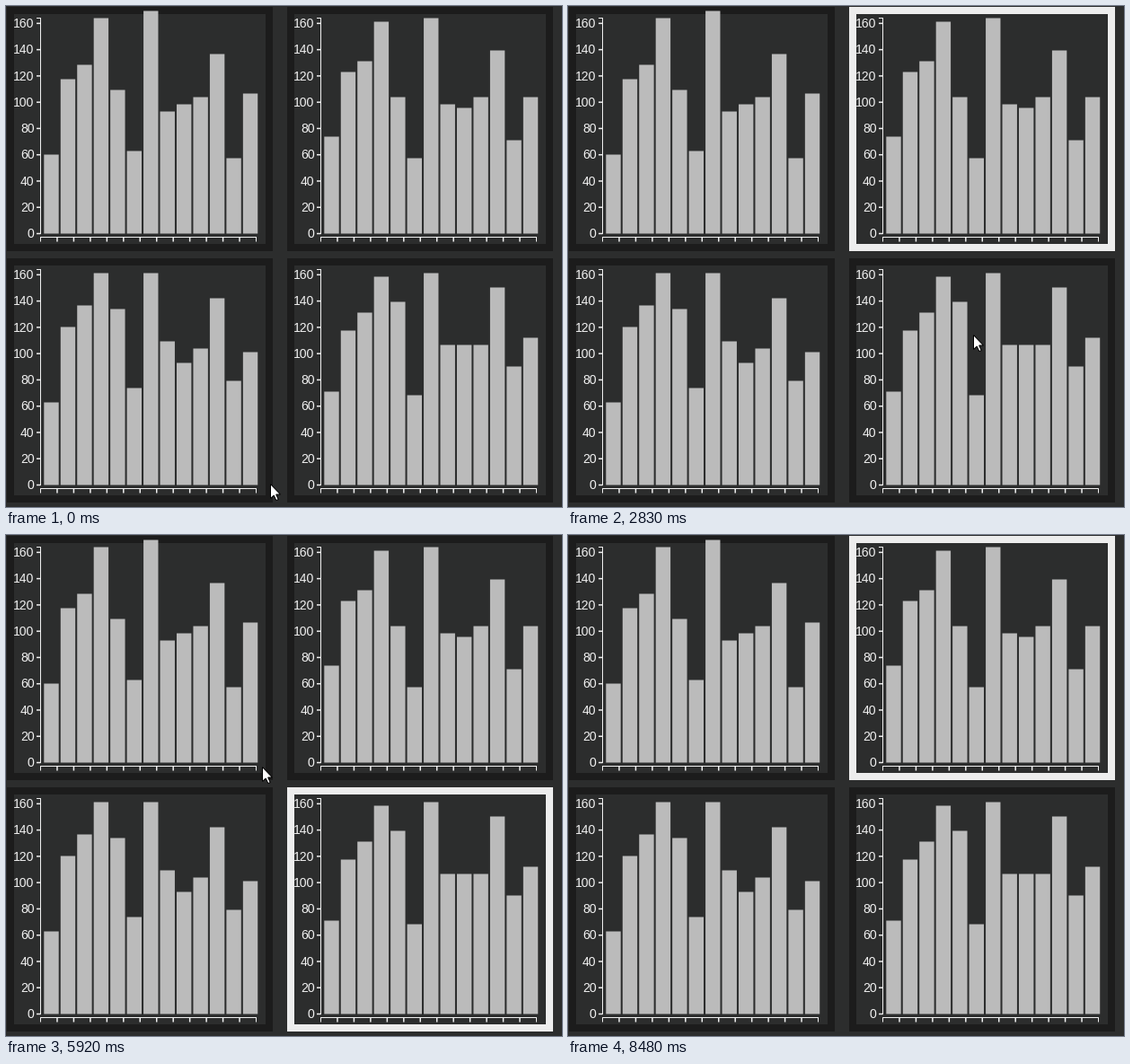
These frames come from a looping animation (619x558 px, 8.74 s). A matplotlib script:

```python
import matplotlib.pyplot as plt
import numpy as np
from matplotlib.animation import FuncAnimation
from matplotlib.collections import LineCollection, PolyCollection
from matplotlib.patches import Polygon, Rectangle

W, H, DPI = 619, 558, 64
LOOP, STEP = 8740, 20
PX = 72 / DPI  # points per pixel

BACK, BORDER, HOVER = "#2c2d2d", "#1c1c1c", "#ededed"
BAR, INK = "#bbbbbb", "#f0f0f0"

PANEL_DX, PANEL_DY = 312, 280
PLOT = 240       # side of the plot area
UNIT = 4         # pixels per count
SCALE = PLOT / 164

# Bar heights in counts, one row per panel
COUNTS = [
    [22, 43, 47, 60, 40, 23, 62, 34, 36, 38, 50, 21, 39],
    [27, 45, 48, 59, 38, 21, 60, 36, 35, 38, 51, 26, 38],
    [23, 44, 50, 59, 49, 27, 59, 40, 34, 38, 52, 29, 37],
    [26, 43, 48, 58, 51, 25, 59, 39, 39, 39, 55, 33, 41],
]
PITCH = PLOT / len(COUNTS[0])

# (start ms, pointer x, pointer y)
POINTER = np.array([
    (0, 294, 532), (440, 293, 528), (580, 291, 500), (700, 282, 400),
    (830, 268, 282), (980, 240, 230), (1130, 230, 228), (1260, 228, 227),
    (1410, 290, 226), (1530, 366, 225), (1680, 394, 225), (1800, 403, 225),
    (2410, 409, 245), (2530, 431, 319), (2680, 450, 363), (2830, 451, 366),
    (3290, 430, 367), (3430, 370, 331), (3550, 290, 283), (3680, 225, 240),
    (3800, 199, 217), (5220, 215, 223), (5350, 245, 238), (5470, 275, 250),
    (5620, 281, 254), (5770, 282, 256), (5920, 285, 258), (6660, 340, 310),
    (6780, 410, 350), (6900, 430, 290), (7020, 437, 248), (7900, 437, 255),
    (8060, 472, 388), (8210, 520, 480), (8330, 544, 539),
])
POINTER_GONE = 8480
SELECTION = [(0, None), (2100, 1), (3130, 3), (7440, 1)]

ARROW = np.array([(0.5, 0.5), (0.5, 16.5), (4.2, 13), (6.8, 18.6),
                  (9.2, 17.6), (6.7, 12), (11.5, 12)])

fig = plt.figure(figsize=(W / DPI, H / DPI), dpi=DPI, facecolor=BACK)
ax = fig.add_axes([0, 0, 1, 1])
ax.set_xlim(0, W)
ax.set_ylim(H, 0)
ax.axis("off")


def box(x, y, w, h):
    return [(x, y), (x + w, y), (x + w, y + h), (x, y + h)]


def add_panel(x, y):
    frame = ax.add_patch(Rectangle((x + 1, y + 1), 296, 272, fc=BORDER, lw=0))
    ax.add_patch(Rectangle((x + 9, y + 9), 280, 256, fc=BACK, lw=0))
    return frame


def add_chart(x, y, counts):
    left, base = x + 38.5, y + 253.5
    bars = [box(left + 3.8 + i * PITCH, base - n * UNIT, 16.4, n * UNIT)
            for i, n in enumerate(counts)]
    ax.add_collection(PolyCollection(bars, facecolors=BAR, linewidths=0,
                                     snap=False, zorder=2))

    end, line = left + PLOT, base + 4
    axis = [[(left - 4.5, base - PLOT), (left, base - PLOT),
             (left, base), (left - 4.5, base)],
            [(left, line + 5), (left, line), (end, line), (end, line + 5)]]
    ticks = [[(left + i * PITCH, line), (left + i * PITCH, line + 5)]
             for i in range(1, len(counts))]
    for value in range(0, 161, 20):
        ty = base - value * SCALE
        ticks.append([(left - 4.5, ty), (left, ty)])
        ax.text(left - 7, ty + 4.7, str(value), color=INK, ha="right",
                va="baseline", fontsize=14 * PX,
                fontname="Liberation Sans", zorder=4)
    for lines, width in ((axis, 1), (ticks, 1.5)):
        ax.add_collection(LineCollection(lines, colors=INK, snap=False,
                                         linewidths=width * PX, zorder=3))


frames = []
for k, row in enumerate(COUNTS):
    px, py = k % 2 * PANEL_DX, k // 2 * PANEL_DY
    frames.append(add_panel(px, py))
    add_chart(px, py, row)

pointer = ax.add_patch(Polygon(ARROW, closed=True, fc="white", ec="black",
                               lw=PX, joinstyle="miter", zorder=5))


def update(i):
    t = i * STEP + STEP / 2
    selected = [panel for start, panel in SELECTION if start <= t][-1]
    for k, frame in enumerate(frames):
        frame.set_facecolor(HOVER if k == selected else BORDER)
    at = np.searchsorted(POINTER[:, 0], t, side="right") - 1
    pointer.set_xy(ARROW + POINTER[at, 1:])
    pointer.set_visible(t < POINTER_GONE)
    return [*frames, pointer]


anim = FuncAnimation(fig, update, frames=LOOP // STEP, interval=STEP,
                     repeat=True, repeat_delay=0, blit=False)
plt.show()
```
